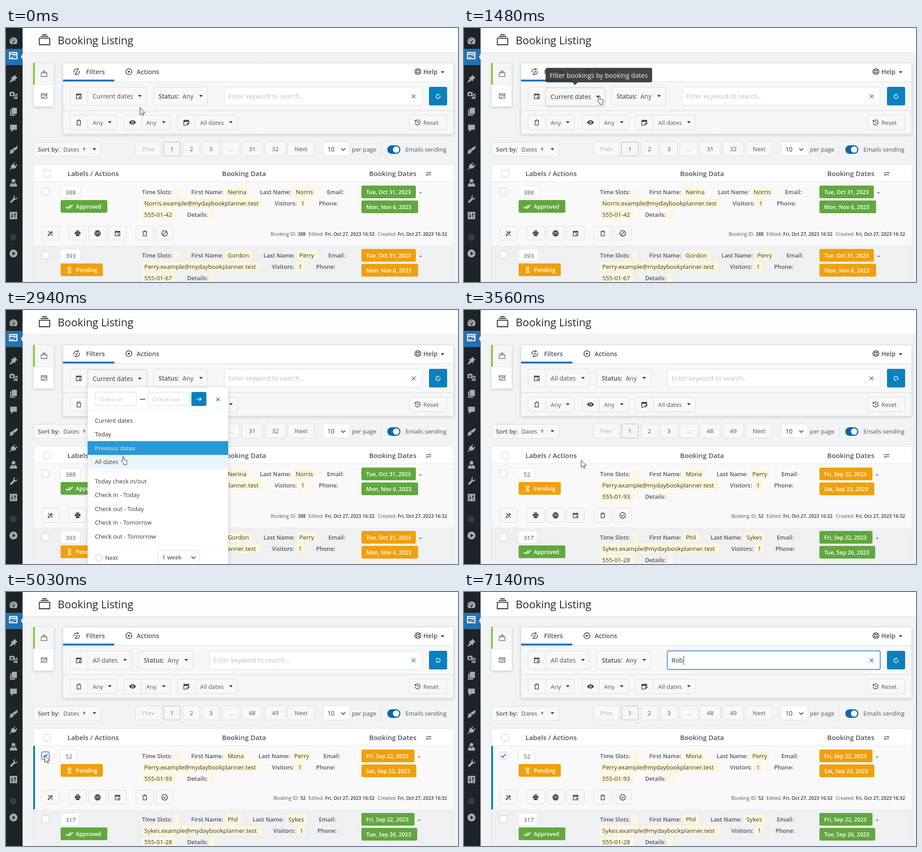
An HTML page with a canvas for the animation above (8 s loop, 997 by 561 pixels).

```html
<!DOCTYPE html>
<html lang="en">
<head>
<meta charset="utf-8">
<title>Booking Listing</title>
<style>
html, body { margin: 0; width: 100%; height: 100%; overflow: hidden; background: #f2f3f4; }
canvas { display: block; width: 997px; height: 561px; }
</style>
</head>
<body>
<canvas id="stage"></canvas>
<script>
const W = 997, H = 561, LOOP = 8000;
const FONT = '"Open Sans", "Noto Sans", sans-serif';
const INK = '#50545a', DARK = '#33373c', LINE = '#dcdcde', BLUE = '#0a80be', LINK = '#2271b1';
const GREEN = '#61a83f', ORANGE = '#f0a00c';

const canvas = document.getElementById('stage');
const c = canvas.getContext('2d');
const dpr = window.devicePixelRatio || 1;
canvas.width = W * dpr;
canvas.height = H * dpr;

const clamp = v => Math.max(0, Math.min(1, v));
const ramp = (t, from, dur) => clamp((t - from) / dur);

// Icons on a 16 unit grid: [stroked path, filled path]
const RING = 'M8 1.5a6.5 6.5 0 1 0 .01 0z';
const ICONS = {
  gauge: ['', 'M1 9a7 7 0 1 1 14 0q0 3-2 5H3Q1 12 1 9zM7 10l4.5-4.5L9 11.5a1.3 1.3 0 1 1-2-1.5zM3 8h1.5v1.5H3zM4.5 5H6v1.5H4.5zM7.3 3.5h1.5V5H7.3z'],
  pin: ['', 'M9.5 1l5.500 5.500-1.500.7-2.500 2.500-.3 3.300-2.200-2.200L2 15l-1-1L5.200 7.700 3 5.500l3.300-.3L8.800 2.500z'],
  media: ['', 'M1 3h2l1-1h3l1 1h2v7H1zM5.5 4.5a2 2 0 1 0 .01 0zM11 6h4v7.5a2 1.6 0 1 1-1.5-1.4V8H12v5a2 1.6 0 1 1-1.5-1.4z'],
  pages: ['', 'M5 1h9v11H5zM2 4h2v9h7v2H2z'],
  comment: ['', 'M2 2h12v9H8l-4 4v-4H2z'],
  brush: ['', 'M15 1v4.500L9.500 10 6 6.500zM5.500 7L9 10.500l-2 3-6 2L2.500 10l-1-1z'],
  plug: ['', 'M10 1l1.2 1.2-2.5 2.5 2.6 2.6 2.5-2.5L15 6l-2.5 2.5.8.8-2 2Q8 13.5 5 12l-3 3-1-1 3-3Q2.5 8 4.8 5.8l2-2 .8.8z'],
  user: ['', 'M8 1a3.300 3.300 0 1 0 .01 0zM1.500 14.500q0-5.500 4-6.500L8 10.500 10.500 8q4 1 4 6.500z'],
  wrench: ['', 'M11 1q-4 .5-3 5l-6.500 6.500L4 15l6.500-6.500q4 .5 4.500-4l-2.500 2L10 6l-.2-2.500z'],
  sliders: ['', 'M1.5 1.5h13v13h-13zM5 3.5h1v5h1.5V10H6v2.5H5V10H3.5V8.5H5zM10 3.5h1v2h1.5V7H11v5.5h-1V7H8.5V5.500H10z'],
  dot: ['', 'M8 1a7 7 0 1 0 .01 0z'],
  play: ['', 'M8 1a7 7 0 1 0 .01 0zM6.5 4.5l5 3.5-5 3.5z'],
  stack: ['M1.2 6h13.6v8.5H1.2zM3 3.7h10M5 1.5h6', ''],
  card: ['M1.8 2.8h12.4v10.4H1.8zM1.8 5.8h12.4', 'M8 7.8h4.5V9H8zM3.7 10.2h4.5v1.2H3.7z'],
  event: ['M2.5 3.5h11v10.5h-11zM5 1.5v2M11 1.5v2', 'M2.5 3.5h11V6h-11zM8.5 9h3v3h-3z'],
  filters: ['M2 10A6.3 6.3 0 0 1 10 2.3M6 13.700A6.300 6.300 0 0 0 14 6M5.500 8l2 2L11 6', 'M9.500.2l3.800 2.600-4 2zM6.500 15.800l-3.800-2.600 4-2z'],
  target: [RING, 'M8 6a2 2 0 1 0 .01 0z'],
  buoy: [RING + 'M8 5a3 3 0 1 0 .01 0zM3.5 3.5L6 6M10 10l2.5 2.5M12.5 3.5L10 6M6 10l-2.5 2.5', ''],
  reset: ['M2.5 5.5A6 6 0 1 1 2 9M2 2.5v3.2h3.2M8 5v3.5h2.5', ''],
  refresh: ['M8 3a5.3 5.3 0 1 0 4.8 3', 'M7.5.3l4 2.7-4 2.7z'],
  trash: ['M3 4h10M4.2 4v10h7.600V4M6 2h4', ''],
  eye: ['', 'M0 8q8-10 16 0-8 10-16 0zM8 4.8a3.2 3.2 0 1 0 .01 0zM8 6.2a1.8 1.8 0 1 0 .01 0z'],
  edit: ['M14 6V3.5H2.5v11H7M2.5 6H14M5 1.5v2M11.5 1.5v2M9 14l.5-2 4-4L15 9.5l-4 4z', 'M2.5 3.5H14V6H2.5z'],
  printer: ['', 'M4 1.5h8V4H4zM1.5 5h13v6H13V9H3v2H1.5zM4 10h8v4.5H4z'],
  globe: [RING + 'M8 1.5q-5.5 6.5 0 13 5.5-6.5 0-13M1.5 8h13M2.5 4.8h11M2.5 11.2h11', ''],
  ban: [RING + 'M3.5 12.5l9-9', ''],
  tickRing: [RING + 'M5 8l2 2 4-4', ''],
  wand: ['M2.5 13.5l.8-3 7.2-7.2 2.2 2.2-7.2 7.2zM3 3l4 4M9.5 10l4 3.5M9 5l2 2', ''],
  checks: ['M.5 8.5l3 3 7-7M7 10.5l1 1 7-7', ''],
  glass: ['M3.5 1.5h9M3.5 14.5h9M5 1.5v3L8 8l3-3.5v-3M5 14.5v-3L8 8l3 3.5v3', ''],
  swap: ['M1 5.5h13L11.5 3M15 10.5H2L4.5 13', ''],
  close: ['M3 3l10 10M13 3L3 13', ''],
  right: ['M2 8h12M9.5 3.5L14 8l-4.5 4.5', ''],
  up: ['M8 14V3M4 7l4-4 4 4', ''],
  down: ['M2.5 5.5L8 11l5.5-5.5', ''],
  tick: ['M2.5 8.5l3.5 4 7.5-9', '']
};
for (const k in ICONS) ICONS[k] = ICONS[k].map(d => new Path2D(d));

const ARROW = new Path2D('M0 0v16l3.8-3.5 2.6 5.5 2.3-1-2.5-5.4h5z');
const HAND = new Path2D('M4 1.5q1.5-2 3 0v6l6 1.5q1.5.5 1 2.5l-1 5.5v2H6.5v-2l-5-6q0-2 2.5-.5z');
const BEAM = new Path2D('M-3-8h2.5l.5.5.5-.5H3M0-8V8M-3 8H3');

function icon(name, x, y, size = 16, color = DARK, weight = 1.4, turn = 0) {
  const [line, solid] = ICONS[name];
  c.save();
  c.translate(x, y);
  c.rotate(turn);
  c.scale(size / 16, size / 16);
  c.translate(-8, -8);
  c.strokeStyle = c.fillStyle = color;
  c.lineWidth = weight;
  c.stroke(line);
  c.fill(solid, 'evenodd');
  c.restore();
}

// y is the middle of the capital letters
function text(s, x, y, size = 13.1, color = INK, weight = 400, align = 'left') {
  c.font = `${weight} ${size}px ${FONT}`;
  c.textAlign = align;
  c.fillStyle = color;
  c.fillText(s, x, y + size * 0.357);
}

const rect = (x1, y1, x2, y2, color) => {
  c.fillStyle = color;
  c.fillRect(x1, y1, x2 - x1, y2 - y1);
};

function box(x1, y1, x2, y2, fill, edge, r = 3, blur = 0) {
  const o = edge ? 0.5 : 0;
  c.save();
  c.beginPath();
  c.roundRect(x1 + o, y1 + o, x2 - x1 - 2 * o, y2 - y1 - 2 * o, r);
  if (blur) {
    c.shadowColor = 'rgba(0,0,0,.16)';
    c.shadowBlur = blur * dpr;
    c.shadowOffsetY = 2 * dpr;
  }
  c.fillStyle = fill;
  c.fill();
  c.restore();
  if (edge) {
    c.strokeStyle = edge;
    c.lineWidth = 1;
    c.stroke();
  }
}

function poly(color, ...p) {
  c.beginPath();
  for (let i = 0; i < p.length; i += 2) c.lineTo(p[i], p[i + 1]);
  c.fillStyle = color;
  c.fill();
}
const caret = (x, y) => poly(DARK, x - 4, y - 2, x + 4, y - 2, x, y + 2.5);
const button = (x1, y1, x2, y2) => box(x1, y1, x2, y2, '#f8f8f9', LINE);

function sidebar() {
  rect(0, 0, 36.5, H, '#1d2327');
  rect(0, 46, 36.5, 82, LINK);
  poly('#f2f3f4', 37, 57, 33, 63.5, 37, 70);
  icon('card', 16, 61, 21, '#fff', 1.7);
  const items = { gauge: 28, pin: 112, media: 148, pages: 185, comment: 221, brush: 269, plug: 305, user: 342, wrench: 378, sliders: 414, play: 498 };
  for (const k in items) icon(k, 16.5, items[k], 20, '#a7aaad');
  icon('dot', 16, 462, 17, '#343b41');
}

function heading() {
  rect(36, 0, W, 54, '#fdfdfd');
  rect(36, 54, W, 55, '#dfe0e1');
  icon('stack', 85, 26, 27, '#23272b', 1.1);
  text('Booking Listing', 114, 28, 23.6, '#23272b');
  box(60, 77, 106, 174, '#fff', '#e4e4e4', 1, 6);
  rect(61, 78, 105, 125, '#f6f6f6');
  rect(61, 125, 105, 126, '#e6e6e6');
  rect(60, 77, 63.5, 125, '#7ac52c');
  icon('stack', 84, 101, 15, '#555', 1.2);
  icon('card', 84, 150, 16, '#555', 1.2);
}

// A button with an icon cell on its left
function combo(x1, x2, y1, y2, name, cell, label, size) {
  const y = (y1 + y2) / 2;
  button(x1, y1, x2, y2);
  rect(cell, y1, cell + 1, y2, LINE);
  icon(name, (x1 + cell) / 2, y, 15.5);
  text(label, cell + 11, y + .5, size);
  caret(x2 - 15, y - .5);
}

function toolbar(t) {
  box(125, 77, 988, 235, '#f6f7f7', '#d8d9da', 1, 7);
  rect(126, 78, 987, 118, '#fff');
  rect(126, 118, 987, 119, '#dbdcdd');
  rect(126, 182, 987, 183, '#d6d7d8');
  rect(126, 114, 239, 118, '#0b74bf');
  icon('filters', 156, 96.5);
  text('Filters', 176.5, 97, 14, INK, 600);
  icon('target', 271, 96.5);
  text('Actions', 288, 97, 14, INK, 600);
  icon('buoy', 908.5, 96.5);
  text('Help', 920.5, 97, 14, INK, 600);
  caret(963, 97.5);

  const all = t >= 3040, shift = all ? -32.5 : 0, end = 310 + shift;
  combo(141, end, 130, 171, 'event', 180, all ? 'All dates' : 'Current dates', 14);
  if (!all && t >= 1340) {
    box(180, 132, 311, 172, '#f7f7f7', '#d5d6d7', 3, 5);
    text('Current dates', 191, 152.5, 14, DARK);
    caret(295, 151.5);
  }
  button(325 + shift, 130, 445 + shift, 171);
  text('Status:', 336.5 + shift, 151, 13.6, INK, 600);
  text('Any', 389 + shift, 151, 14);
  caret(430 + shift, 150);

  searchBox(t, 481 + shift);
  box(933, 130, 973, 171, BLUE, '', 3);
  const stop = 3.6;
  const turn = t < 6430 ? ramp(t, 3040, 640) * (2 * Math.PI + stop) : 0;
  icon('refresh', 953, 151, 13.5, '#fff', 1.7, turn);

  combo(141, 244, 192, 225, 'trash', 180, 'Any', 13.2);
  combo(260, 363, 192, 225, 'eye', 298, 'Any', 13.2);
  combo(378, 511, 192, 225, 'edit', 417, 'All dates', 13.2);
  button(889, 192, 973, 225);
  icon('reset', 908, 208.5, 15);
  text('Reset', 920.5, 209, 13.2);
}

function searchBox(t, x) {
  const focus = ramp(t, 6470, 60);
  box(x, 130, 918, 171, '#fff', LINE);
  if (focus) {
    c.globalAlpha = focus;
    box(x - 1, 129, 919, 172, '#4f94d4', '', 4);
    box(x + 1, 131, 917, 170, '#fff', '', 2);
    c.globalAlpha = 1;
  }
  const typed = 'Rob'.slice(0, Math.max(0, Math.ceil((t - 6640) / 200)));
  if (typed) text(typed, x + 9, 151.5, 14, DARK);
  else text('Enter keyword to search...', x + 9, 151.5, 14, '#bfc1c4');
  if (focus) {
    const end = x + 10 + c.measureText(typed).width;
    rect(end, 141, end + 1, 161, '#222');
  }
  icon('close', 899, 151, 13, LINK, 1.6);
}

function paging(t) {
  button(60, 252, 210, 284);
  text('Sort by:', 70.5, 268, 13.1, INK, 600);
  text('Dates', 126.5, 268, 13.1);
  icon('up', 172.5, 268, 10, INK, 1.8);
  caret(195, 267.5);
  const last = t < 3380 ? ['31', '32'] : ['48', '49'];
  const cells = [['Prev', 285, 343], ['1', 347, 385], ['2', 390, 428], ['3', 433, 471], ['...', 476, 516],
    [last[0], 520, 566], [last[1], 571, 617], ['Next', 621, 681]];
  for (const [s, a, b] of cells) {
    const faint = s === 'Prev' || s === '...';
    button(a, 251, b, 283);
    if (s === '1') {
      box(a, 251, b, 283, '#ebebec', '#b8babc');
      box(a + 2, 253, b - 2, 282, '#f6f6f6', '', 2);
    }
    text(s, (a + b) / 2, 267.5, 13.1, faint ? '#b4b6b9' : INK, 400, 'center');
  }
  box(699, 251, 759, 283, '#fff', LINE);
  text('10', 709, 268, 13.6, DARK);
  icon('down', 744, 268, 13, DARK, 2);
  text('per page', 763, 268);
  rect(828, 252, 829, 284, LINE);
  box(841, 259, 870, 278, '#0b68ab', '', 9.5);
  c.beginPath();
  c.arc(860.5, 268.5, 7, 0, 7);
  c.fillStyle = '#fff';
  c.fill();
  text('Emails sending', 881, 268.5, 13);
}

const row = (id, idEnd, ok, first, firstEnd, last, lastEnd, mailEnd, phone, from, fromEnd, to, toEnd) =>
  ({ id, idEnd, ok, first, firstEnd, last, lastEnd, mailEnd, phone, from, fromEnd, to, toEnd });
const CURRENT = [
  row('388', 165, true, 'Nerina', 535, 'Norris', 682, 567, '555-01-42', 'Tue, Oct 31, 2023', 904, 'Mon, Nov 6, 2023', 909),
  row('393', 164, false, 'Gordon', 543, 'Perry', 685, 561, '555-01-67', 'Tue, Oct 31, 2023', 904, 'Mon, Nov 6, 2023', 909)
];
const ALL = [
  row('52', 157, false, 'Mona', 532, 'Perry', 674, 561, '555-01-93', 'Fri, Sep 22, 2023', 901, 'Sat, Sep 23, 2023', 905),
  row('317', 162, true, 'Phil', 519, 'Sykes', 664, 564, '555-01-28', 'Fri, Sep 22, 2023', 901, 'Tue, Sep 26, 2023', 907)
];

function checkbox(x, y, on, focus) {
  if (focus) box(x - 2, y - 2, x + 19, y + 19, '#b5d2ee', '', 5);
  box(x, y, x + 17, y + 17, '#fff', focus ? LINK : '#c5c7ca', 4);
  if (on) icon('tick', x + 8.5, y + 8.5, 13, '#1173c4', 2.6);
}

function field(label, x, y, value, a, b) {
  if (label) text(label, x, y, 12.7, INK, 600);
  if (a) {
    box(a, y - 11, b, y + 10, '#fff7d9', '', 3);
    text(value, a + 5, y, 13.2, DARK);
  }
}

function tag(s, x2, y, color) {
  box(784, y, x2, y + 28, color, '', 3);
  text(s, 794.5, y + 15, 12.1, '#fff', 600);
}

function booking(r, dy, on, focus) {
  c.save();
  c.translate(0, dy);
  const color = r.ok ? GREEN : ORANGE;
  checkbox(78.5, 353, on, focus);
  box(120, 348, r.idEnd, 376, '#fff', '#e2e3e5');
  text(r.id, 131.5, 363, 13.1);
  box(120.5, 380, r.ok ? 223.5 : 213.5, 408, color, '', 3);
  icon(r.ok ? 'checks' : 'glass', 140, 394.5, r.ok ? 17 : 14, '#fff', 1.7);
  text(r.ok ? 'Approved' : 'Pending', 154, 395, 12.1, '#fff', 600);

  const last = r.firstEnd + 25, visits = r.mailEnd + 26;
  field('Time Slots:', 300, 362, '', 372, 383);
  field('First Name:', 408.5, 362, r.first, 484, r.firstEnd);
  field('Last Name:', last, 362, r.last, last + 74, r.lastEnd);
  field('Email:', r.lastEnd + 26, 362);
  field('', 0, 387, r.last + '.example@mydaybookplanner.test', 300, r.mailEnd);
  field('Visitors:', visits - .5, 387, '1', visits + 53, visits + 71);
  field('Phone:', visits + 97, 387);
  field('', 0, 412, r.phone, 300, 374);
  field('Details:', 399.5, 412, '', 449, 460);

  tag(r.from, r.fromEnd, 348, color);
  text('-', r.fromEnd + 7.5, 363, 17, DARK, 600);
  tag(r.to, r.toEnd, 381, color);

  const actions = ['wand', 'printer', 'globe', 'event', 'trash', r.ok ? 'ban' : 'tickRing'];
  [78, 138, 182, 226, 286, 330].forEach((x, i) => {
    button(x, 437, x + 40, 469);
    icon(actions[i], x + 20, 453.5, 15);
  });
  const stamp = 'Fri, Oct 27, 2023 16:32';
  text(r.id, 661, 455, 10.4, DARK, 600, 'right');
  text('Booking ID:', 658 - c.measureText(r.id).width, 455, 10.6, INK, 400, 'right');
  text('Edited:', 667, 455, 10.5);
  text(stamp, 704, 455, 10.4, DARK, 600);
  text('Created:', 820, 455, 10.5);
  text(stamp, 864, 455, 10.4, DARK, 600);
  c.restore();
}

function table(t) {
  box(60, 301, 989, 600, '#fff', '#e1e2e4', 3);
  rect(61, 339, 988, 340, '#e3e4e6');
  rect(61, 340, 988, 480, '#f9f9f9');
  rect(61, 480, 988, H, '#eef0f2');
  checkbox(82, 313);
  text('Labels / Actions', 135.5, 322, 15, INK, 600);
  text('Booking Data', 476.5, 322, 15, INK, 600);
  text('Booking Dates', 801, 322, 15, INK, 600);
  icon('swap', 932, 322, 13, DARK, 1.5);
  const rows = t < 3380 ? CURRENT : ALL;
  const on = t >= 4700;
  if (on) rect(60, 340, 64, 480, '#0a81b5');
  booking(rows[0], 0, on, on && t < 6430);
  booking(rows[1], 140);
}

function tooltip(t) {
  const a = Math.min(ramp(t, 1395, 75), 1 - ramp(t, 1560, 70)) * 0.92;
  if (a <= 0) return;
  c.globalAlpha = a;
  box(180, 88, 415, 120, '#333', '', 4);
  poly('#333', 239, 120, 251, 120, 245, 126);
  text('Filter bookings by booking dates', 189, 104.5, 14.4, '#fff');
  c.globalAlpha = 1;
}

// Menu entries: label, hover start, hover end
const MENU = [['Current dates', 2400, 2600], ['Today', 2600, 2740], ['Previous dates', 2740, 2930], ['All dates', 2930, 9000]];
const MORE = ['Today check in/out', 'Check in - Today', 'Check out - Today', 'Check in - Tomorrow', 'Check out - Tomorrow'];

function dropdown(t) {
  if (t < 1600 || t >= 3040) return;
  box(180, 171, 490, 580, '#fff', '', 2, 12);
  for (const [s, a] of [['Check-in', 196], ['Check-out', 313]]) {
    box(a, 181, a + 92, 212, '#fff', '#d5d7d9');
    text(s, a + 9, 197, 13.2, '#c3c5c8');
  }
  rect(295, 196.5, 307, 198, DARK);
  box(409, 181, 442, 212, BLUE, '', 3);
  icon('right', 425.5, 197, 13, '#fff', 1.8);
  icon('close', 467.5, 197.5, 12, LINK, 1.9);
  for (const y of [222, 355, 520]) rect(180, y, 490, y + 1, '#ebecee');

  MENU.forEach(([s, from, to], i) => {
    const y = 244 + i * 30.5;
    const a = ramp(t, from, 130) * (1 - ramp(t, to, 130));
    rect(180, y - 15.5, 490, y + 15, `rgba(20,144,211,${a})`);
    const g = Math.round(48 + 207 * a);
    text(s, 196, y, 13.1, `rgb(${g},${g},${g})`);
  });
  MORE.forEach((s, i) => text(s, 196, 378 + i * 30.5, 13.1, DARK));
  box(197, 539, 213, 555, '#fff', '#b9bbbe', 8);
  text('Next', 218.5, 547, 13.1, DARK);
  box(335, 530, 428, 580, '#fff', '#d5d7d9');
  text('1 week', 344.5, 546, 13.1, DARK);
  icon('down', 413.5, 546.5, 13, DARK, 2);
}

// Pointer path: time, x, y
const PATH = [
  [0, 295, 175], [1200, 295, 175], [1480, 298, 149], [2170, 298, 149], [2400, 272, 228], [2500, 259, 254],
  [2600, 258, 260], [2740, 259, 289], [2940, 258, 322], [2970, 258, 330], [3830, 258, 332], [4210, 106, 350],
  [4620, 85, 360], [5670, 85, 360], [6060, 44, 290], [6250, 210, 200], [6460, 500, 151], [LOOP, 500, 151]
];

function slope(i, k) {
  const a = PATH[i - 1], b = PATH[i], d = PATH[i + 1];
  if (!a || !d) return 0;
  const u = (b[k] - a[k]) / (b[0] - a[0]), v = (d[k] - b[k]) / (d[0] - b[0]);
  return u * v > 0 ? 2 * u * v / (u + v) : 0;
}

function along(t, k) {
  const i = PATH.findIndex(p => p[0] > t) - 1;
  const a = PATH[i], b = PATH[i + 1], h = b[0] - a[0], s = (t - a[0]) / h;
  const e = s * s * (3 - 2 * s), q = s * (1 - s);
  return a[k] + (b[k] - a[k]) * e + h * q * ((1 - s) * slope(i, k) - s * slope(i + 1, k));
}

function pointer(t) {
  if (t >= 6640) return;
  const hand = t >= 1340 && t < 3040, beam = t >= 6400;
  c.save();
  c.translate(along(t, 1) - (hand ? 5.5 : 0) + .5, along(t, 2) + .5);
  const shape = beam ? BEAM : hand ? HAND : ARROW;
  c.fillStyle = '#fff';
  c.strokeStyle = '#222';
  c.lineWidth = 1;
  if (!beam) c.fill(shape);
  c.stroke(shape);
  c.restore();
}

function draw(now) {
  const t = now % LOOP;
  c.setTransform(dpr, 0, 0, dpr, 0, 0);
  rect(0, 0, W, H, '#f2f3f4');
  heading();
  sidebar();
  toolbar(t);
  paging(t);
  table(t);
  dropdown(t);
  tooltip(t);
  pointer(t);
}

const start = performance.now();
(function frame() {
  draw(performance.now() - start);
  requestAnimationFrame(frame);
})();
</script>
</body>
</html>
```
